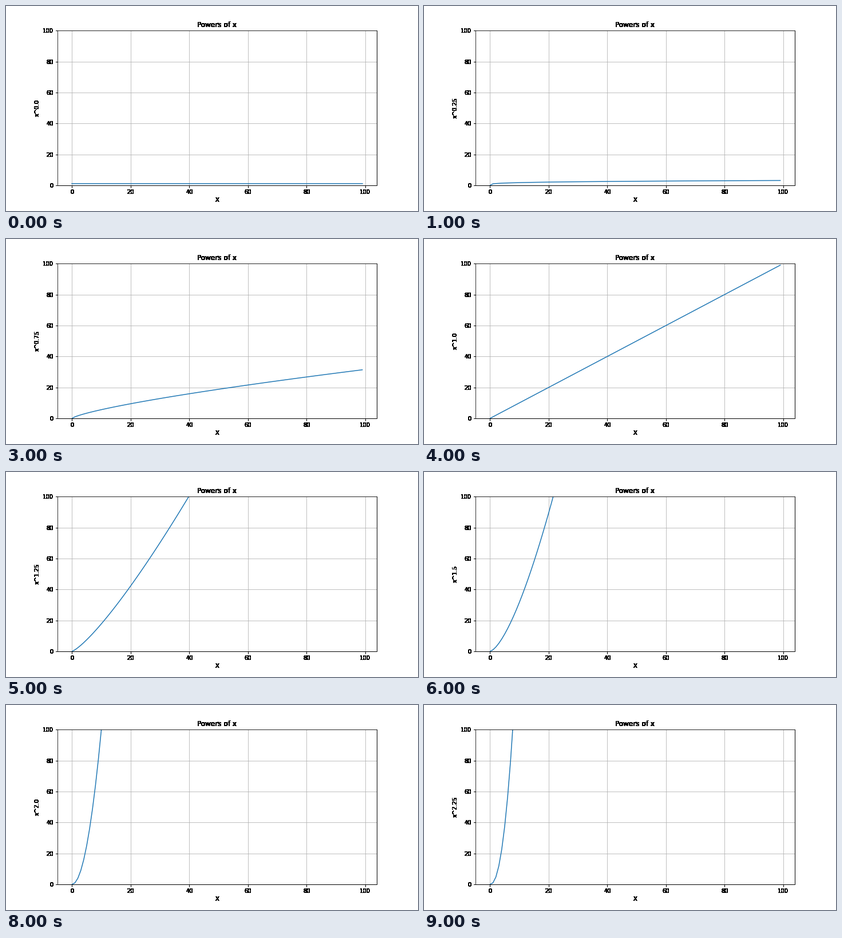
Recreate the animation shown at these times as a matplotlib script. Size 720 by 360 pixels, loop 10000 ms.

```python
import numpy as np
import matplotlib.pyplot as plt
from matplotlib.animation import FuncAnimation

plt.rcParams["font.family"] = "DejaVu Sans"

STEPS = 10
x = np.arange(100)
powers = np.arange(STEPS) * 0.25


def harden(image, dpi):
    """Turn every touched pixel solid black, without soft edges."""
    solid = np.zeros_like(image)
    solid[..., 3] = image[..., 3] > 0
    return solid, 0, 0


fig, ax = plt.subplots(figsize=(10, 5), dpi=72, facecolor="white")
fig.subplots_adjust(left=0.125, right=0.9, bottom=0.125, top=0.88)
curve, = ax.plot(x, x ** 0.0, color="#1f77b4", lw=1.5)
ax.set_xlim(-4.95, 103.95)
ax.set_ylim(0, 100)
ax.set_xticks(range(0, 101, 20))
ax.set_yticks(range(0, 101, 20))
ax.grid(True)
ax.set_title("Powers of x")
ax.set_xlabel("X")

# everything lying outside the white plot area has hard edges
hard = [ax.title, ax.xaxis.label, ax.yaxis.label,
        ax.spines["right"], ax.spines["bottom"]]
for axis in (ax.xaxis, ax.yaxis):
    hard += axis.get_ticklabels() + list(axis.get_ticklines())
for artist in hard:
    artist.set_agg_filter(harden)


def update(i):
    curve.set_ydata(x ** powers[i])
    ax.set_ylabel(f"x^{float(powers[i])}")
    return [curve]


anim = FuncAnimation(fig, update, frames=STEPS, interval=1000,
                     init_func=lambda: update(0), repeat=True,
                     repeat_delay=0, blit=False)
plt.show()
```
